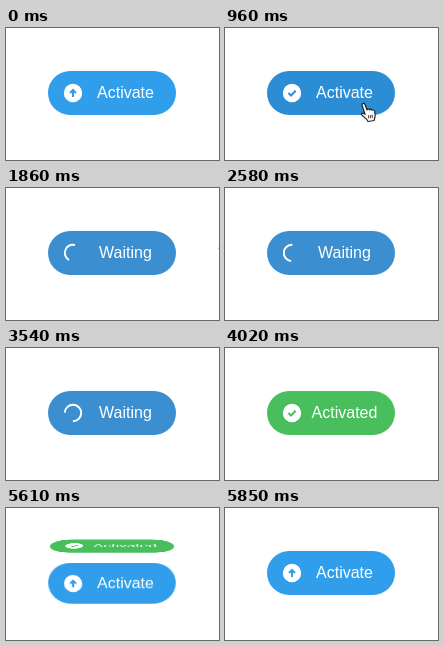
An HTML page that plays this animation: 213 px wide and 132 px high, repeating every 5.88 s.

```html
<!DOCTYPE html>
<html lang="en">
<head>
<meta charset="utf-8">
<title>Activate button</title>
<style>
  html, body { margin: 0; width: 100%; height: 100%; overflow: hidden; background: #fff; }
  body { position: relative; }
  .face { position: absolute; left: 42px; top: 43px; width: 128px; height: 44px; border-radius: 22px; }
  .face svg { position: absolute; left: 14.5px; top: 12px; overflow: visible; }
  .label { position: absolute; left: 0; top: 0; width: 155px; text-align: center; color: #fff;
    font: 16px/44px "Liberation Sans", Arial, sans-serif; white-space: nowrap; }
  .glyph { fill: none; stroke-width: 2; }
  #cursor { position: absolute; left: 0; top: 0; z-index: 5; overflow: visible; }
</style>
</head>
<body>
<div class="face" id="main">
  <svg width="20" height="20" viewBox="-10 -10 20 20">
    <g id="disc">
      <circle r="9.2" fill="#fff"/>
      <path id="arrow" class="glyph" d="M0 4V-3M-3 0L0-3L3 0"/>
      <path id="check" class="glyph" d="M-3.5 0L-1 2.5L3.7-2.3"/>
    </g>
    <circle id="ring" r="8.2" fill="none" stroke="#fff" stroke-width="1.9" pathLength="1"/>
  </svg>
  <div class="label" id="oldText"></div>
  <div class="label" id="newText"></div>
</div>
<div class="face" id="next" style="background:#309eeb">
  <svg width="20" height="20" viewBox="-10 -10 20 20">
    <circle r="9.2" fill="#fff"/>
    <path class="glyph" stroke="#309eeb" d="M0 4V-3M-3 0L0-3L3 0"/>
  </svg>
  <div class="label">Activate</div>
</div>
<svg id="cursor" width="16" height="20">
  <path fill="#fff" stroke="#222" stroke-width="1.2" stroke-linejoin="round"
    d="M1 2C1 0 3.5 0 4 1.5L6 7C6.3 5.5 8 5.5 8.6 7C9 5.7 10.7 5.8 11.2 7.2C12 6.4 13.3 7 13.6 8.2L14.2 12C14.3 14 13.4 15 13.2 17.5L7 18.5C6.5 16.5 3.5 14.5 1 12.2C-.3 10.8 1.3 9.6 2.7 10.4L4 11.3Z"/>
  <path fill="none" stroke="#222" stroke-width=".9" d="M7.3 12.3L7.9 15.5M9.2 12L9.7 15.2M11 11.7L11.5 14.9"/>
</svg>
<script>
const LOOP = 5880, HOVER = 600, CLICK = 1200, DONE = 3600, RESET = 5400, FLIP = 400;
const IDLE_BLUE = [48, 158, 235], HOVER_BLUE = [43, 141, 211], WAIT_BLUE = [59, 143, 208], GREEN = [72, 191, 92];
const el = Object.fromEntries([...document.querySelectorAll('[id]')].map(e => [e.id, e]));

const clamp = x => Math.min(1, Math.max(0, x));
const lerp = (a, b, p) => a + (b - a) * p;
const mix = (a, b, p) => a.map((v, i) => lerp(v, b[i], p));
const smooth = p => p * p * (3 - 2 * p);

// CSS "ease": cubic-bezier(.25, .1, .25, 1)
function ease(x) {
  const curve = (a, b, u) => 3 * a * u * (1 - u) ** 2 + 3 * b * u * u * (1 - u) + u ** 3;
  let low = 0, high = 1;
  for (let i = 0; i < 20; i++) {
    const mid = (low + high) / 2;
    if (curve(.25, .25, mid) < x) low = mid; else high = mid;
  }
  return x <= 0 ? 0 : x >= 1 ? 1 : curve(.1, 1, low);
}
const ramp = (t, start, length = FLIP) => ease(clamp((t - start) / length));

// Places an element on a drum of the given radius.
function roll(node, angle, radius, origin = '50% 50%') {
  node.style.transformOrigin = origin;
  node.style.transform = Math.abs(angle) < .01 ? 'none'
    : `perspective(600px) translateZ(${-radius}px) rotateX(${angle}deg) translateZ(${radius}px)`;
}

function drawLabels(t) {
  const done = t >= DONE;
  const p = ramp(t, done ? DONE : CLICK);
  el.oldText.textContent = done ? 'Waiting' : 'Activate';
  el.newText.textContent = done ? 'Activated' : 'Waiting';
  el.oldText.style.visibility = p < 1 ? 'visible' : 'hidden';
  el.newText.style.visibility = p > 0 ? 'visible' : 'hidden';
  roll(el.oldText, -90 * p, 10);
  roll(el.newText, 90 * (1 - p), 10);
}

function drawIcon(t, color) {
  const hovered = ramp(t, HOVER, 300);
  const waiting = ramp(t, CLICK, 200) - ramp(t, DONE, 300);
  const s = (t - CLICK) / 1000;
  const length = .6 + .3 * Math.cos(Math.PI * s);
  el.disc.setAttribute('opacity', 1 - waiting);
  el.arrow.setAttribute('opacity', 1 - hovered);
  el.check.setAttribute('opacity', hovered);
  el.arrow.setAttribute('stroke', color);
  el.check.setAttribute('stroke', color);
  el.ring.setAttribute('opacity', waiting);
  el.ring.setAttribute('stroke-dasharray', `${length} ${1 - length}`);
  el.ring.setAttribute('transform', `rotate(${466 * s - 188})`);
}

function drawCursor(t) {
  const enter = 1 - (1 - clamp((t - 150) / 520)) ** 2;
  const leave = clamp((t - 1330) / 570);
  const out = lerp(leave, smooth(leave), .5);
  const x = lerp(lerp(152, 136, enter), 216, out);
  const y = lerp(lerp(133, 75, enter), 48, out);
  el.cursor.style.transform = `translate(${x}px, ${y}px)`;
  el.cursor.style.visibility = t > 150 && leave < 1 ? 'visible' : 'hidden';
}

function draw(t) {
  let rgb = mix(IDLE_BLUE, HOVER_BLUE, ramp(t, HOVER, 300));
  rgb = mix(rgb, WAIT_BLUE, ramp(t, CLICK));
  rgb = mix(rgb, GREEN, ramp(t, DONE));
  const color = `rgb(${rgb.map(Math.round)})`;
  el.main.style.background = color;
  drawLabels(t);
  drawIcon(t, color);
  drawCursor(t);

  const p = ramp(t, RESET, 450);
  roll(el.main, 90 * p, 30);
  roll(el.next, -90 * (1 - p), 30);
  el.main.style.zIndex = p < .5 ? 2 : 1;
  el.next.style.zIndex = p < .5 ? 1 : 2;
  el.main.style.opacity = p < 1 ? 1 : 0;
  el.next.style.opacity = t >= RESET ? 1 : 0;
}

const began = performance.now();
function frame() {
  draw((performance.now() - began) % LOOP);
  requestAnimationFrame(frame);
}
frame();
</script>
</body>
</html>
```
